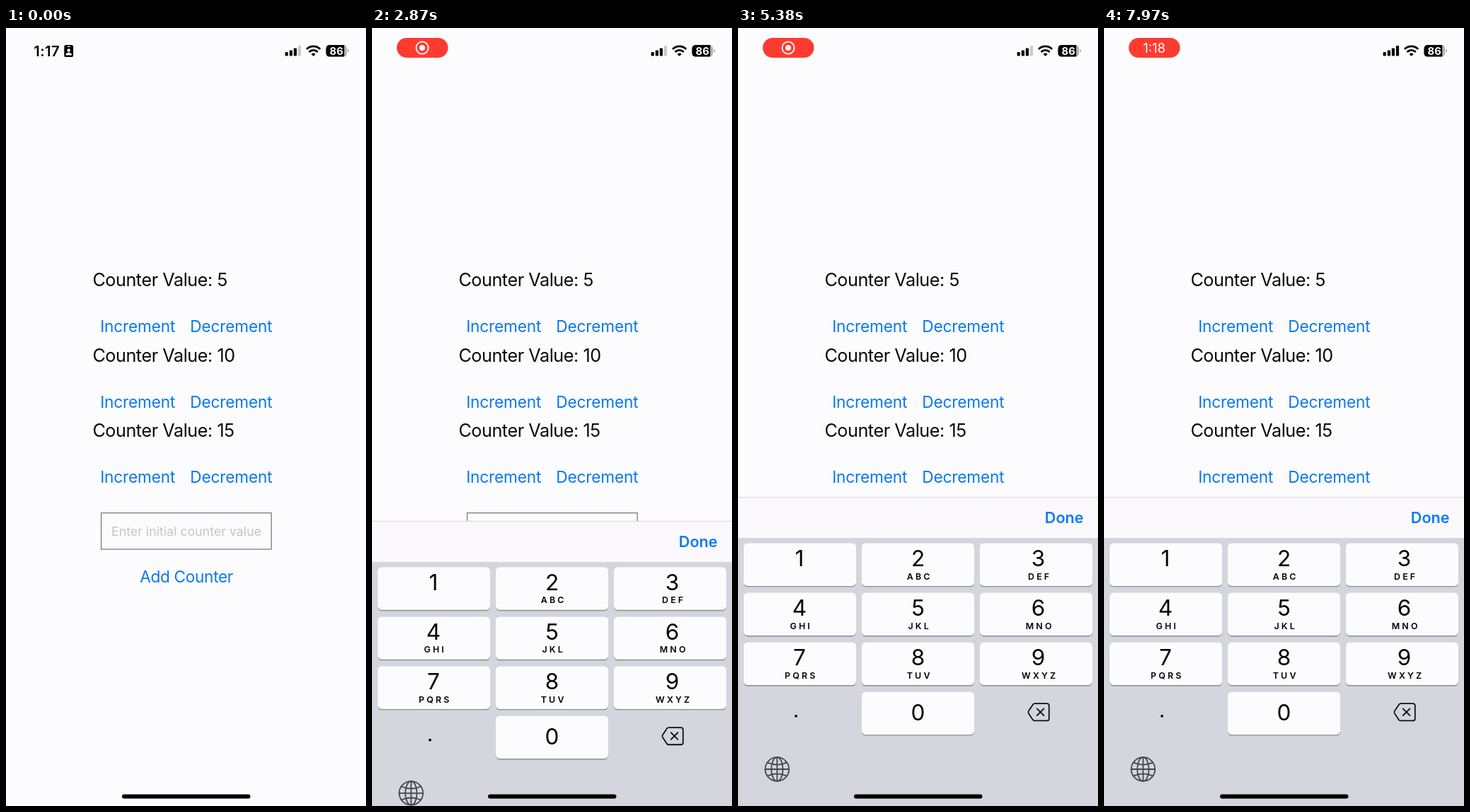
Recreate the animation shown at these times as an HTML page. Size 509x1100 px, loop 8000 ms.

```html
<!DOCTYPE html>
<html lang="en">
<head>
<meta charset="utf-8">
<title>Counter list</title>
<style>
  html, body { margin: 0; width: 100%; height: 100%; overflow: hidden; background: #fcfcfe; }
  svg { display: block; width: 509px; height: 1100px; font-family: Inter, Roboto, sans-serif; }
  .mid { text-anchor: middle; }
  .label { font-size: 25.2px; letter-spacing: -.45px; fill: #08080a; }
  .link { font-size: 22.7px; letter-spacing: -.2px; fill: #0a78ee; }
  .add { letter-spacing: -.35px; }
  .hint { font-size: 17.6px; letter-spacing: .08px; fill: #c4c4c8; }
  .done { font-size: 21.6px; font-weight: 600; fill: #0a7af5; }
  .digit { font-size: 31.5px; }
  .letters { font-size: 12.4px; font-weight: 600; letter-spacing: 3.2px; }
  .line { fill: none; stroke: #111; stroke-width: 1.8; stroke-linecap: round; stroke-linejoin: round; }
</style>
</head>
<body>
<svg viewBox="0 0 509 1100">
  <rect width="509" height="1100" fill="#fcfcfe"/>

  <g id="clock">
    <text x="39.3" y="39.9" font-size="20.2" font-weight="600" letter-spacing=".4">1:17</text>
    <rect x="82.3" y="24" width="12.8" height="17" rx="2.6"/>
    <g fill="#fff">
      <rect x="86.5" y="25.8" width="4.4" height="1.3" rx=".6"/>
      <circle cx="88.7" cy="31.6" r="2.3"/>
      <path d="M84.4 38.6a4.3 3.9 0 0 1 8.6 0z"/>
    </g>
  </g>

  <g id="pill">
    <rect id="pillBody" x="35" y="14" width="72.5" height="28" rx="14"/>
    <g id="record">
      <circle cx="71" cy="28" r="8.6" fill="none" stroke="#fff" stroke-width="1.8"/>
      <circle cx="71" cy="28" r="3.9" fill="#fff"/>
    </g>
    <text id="pillTime" class="mid" x="71" y="34.6" font-size="18.4" fill="#fff">1:18</text>
  </g>

  <g id="status">
    <rect x="394.6" y="34" width="4.2" height="5.6" rx="1"/>
    <rect x="400.8" y="31.4" width="4.2" height="8.2" rx="1"/>
    <rect x="406.8" y="28.6" width="4.2" height="11" rx="1"/>
    <rect id="lastBar" x="412.9" y="25" width="4.2" height="14.6" rx="1"/>
    <g fill="none" stroke="#000" stroke-width="2.8">
      <path d="M425 29.9a13.5 13.5 0 0 1 19.2 0"/>
      <path d="M428.5 34a8.6 8.6 0 0 1 12.2 0"/>
    </g>
    <path d="M434.6 40l-3-3.1a4.4 4.4 0 0 1 6 0z"/>
    <clipPath id="battery"><rect x="452.5" y="24" width="29.6" height="16.6" rx="5"/></clipPath>
    <g clip-path="url(#battery)">
      <rect x="452" y="23" width="31" height="19" fill="#b4b4b8"/>
      <rect x="452" y="23" width="26.2" height="19"/>
    </g>
    <path d="M483.2 29.8q2 .6 2 2.5t-2 2.5z" fill="#b4b4b8"/>
    <text class="mid" x="467.2" y="37.6" font-size="14.8" font-weight="700" fill="#fff">86</text>
  </g>

  <g id="counters"></g>
  <rect x="134.6" y="685.6" width="240.6" height="51.4" fill="none" stroke="#837870" stroke-width="1.3"/>
  <text class="hint mid" x="255" y="717.6">Enter initial counter value</text>
  <rect id="caret" x="148.4" y="698" width="2.7" height="26.4" rx="1.3" fill="#3f6be0"/>
  <text class="link add mid" x="255.1" y="783.6">Add Counter</text>

  <g id="keyboard">
    <rect y="57" width="509" height="400" fill="#d4d5dd"/>
    <rect width="509" height="58" fill="#fcf9fe"/>
    <rect width="509" height="1.2" fill="#dad8dc"/>
    <text class="done mid" x="461.2" y="37">Done</text>
    <g id="keys"></g>
    <circle cx="82" cy="309.8" r="1.9"/>
    <g class="line">
      <path d="M419.5 292.2h17.3q3 0 3 3v18.2q0 3-3 3h-17.3q-1.4 0-2.4-1l-6.3-9.4q-1-1.6 0-3.2l6.3-9.4q1-1.2 2.4-1.2z"/>
      <path d="M422.8 299.4l9.6 9.6M432.4 299.4l-9.6 9.6"/>
    </g>
    <g class="line" style="stroke:#45474c" transform="translate(55.3 385)">
      <circle r="16.8"/>
      <ellipse rx="8.2" ry="16.8"/>
      <path d="M0-16.8v33.6M-16.8 0h33.6M-13.4-9.4q13.4 6 26.8 0M-13.4 9.4q13.4-6 26.8 0"/>
    </g>
  </g>

  <rect x="164" y="1083.6" width="181.5" height="6" rx="3"/>
</svg>
<script>
const LOOP = 8000;
const STAGE_HEIGHT = 1100;
const KEYBOARD_TOP = 663;
const KEYBOARD_START = 2343;
const el = id => document.getElementById(id);
const progress = (t, from, to) => Math.min(1, Math.max(0, (t - from) / (to - from)));

el('counters').innerHTML = [5, 10, 15].map((value, i) => {
  const y = i * 106.5;
  return `<text class="label" x="122.4" y="${365 + y}">Counter Value: ${value}</text>
    <text class="link mid" x="186.2" y="${430.3 + y}">Increment</text>
    <text class="link mid" x="318.4" y="${430.3 + y}">Decrement</text>`;
}).join('');

const key = (digit, letters, col, row) => {
  const x = 8 + col * 167, y = 65.5 + row * 70.1;
  const center = [87, 254.5, 424.5][col];
  return `<rect x="${x}" y="${y + 1.4}" width="159" height="60.4" rx="5.5" fill="#8b8d93"/>
    <rect x="${x}" y="${y}" width="159" height="60.4" rx="5.5" fill="#fcfcfe"/>
    <text class="digit mid" x="${center}" y="${y + (row < 3 ? 32.6 : 40.4)}">${digit}</text>
    <text class="letters mid" x="${center + 2.2}" y="${y + 51}">${letters}</text>`;
};
const letterGroups = ['', 'ABC', 'DEF', 'GHI', 'JKL', 'MNO', 'PQRS', 'TUV', 'WXYZ'];
el('keys').innerHTML =
  letterGroups.map((letters, i) => key(i + 1, letters, i % 3, Math.floor(i / 3))).join('') +
  key(0, '', 1, 3);

// Remaining share of a critically damped spring's travel.
function springRest(ms) {
  const x = Math.max(0, ms) * 0.00797;
  return (1 + x) * Math.exp(-x);
}

function drawPill(t) {
  const p = progress(t, 600, 950);
  const scale = 0.4 + 0.6 * (1 - (1 - p) ** 2);
  el('pill').setAttribute('transform', `translate(71.2 28) scale(${scale}) translate(-71.2 -28)`);
  el('pill').setAttribute('opacity', p);
  el('clock').setAttribute('opacity', 1 - progress(t, 560, 760));

  // The pill pulses gently and darkens while its icon turns into the time.
  const swap = progress(t, 6060, 6400);
  const pulse = 0.5 - 0.5 * Math.cos((t - 2870) / 2550 * 2 * Math.PI);
  const dim = 0.45 * pulse + 0.8 * Math.sin(Math.PI * swap);
  el('pillBody').setAttribute('fill', `rgb(${255 - 29 * dim}, ${59 - 4 * dim}, ${48 - dim})`);
  el('record').setAttribute('opacity', 1 - swap);
  el('pillTime').setAttribute('opacity', swap);
}

function draw(t) {
  drawPill(t);
  const hidden = springRest(t - KEYBOARD_START);
  const top = KEYBOARD_TOP + (STAGE_HEIGHT - KEYBOARD_TOP) * hidden;
  el('keyboard').setAttribute('transform', `translate(0 ${top})`);
  el('caret').setAttribute('opacity', t >= KEYBOARD_START ? 1 : 0);
  el('lastBar').setAttribute('fill', t < 5500 ? '#cbcbce' : '#000');
}

function tick() {
  draw(performance.now() % LOOP);
  requestAnimationFrame(tick);
}
tick();
</script>
</body>
</html>
```
